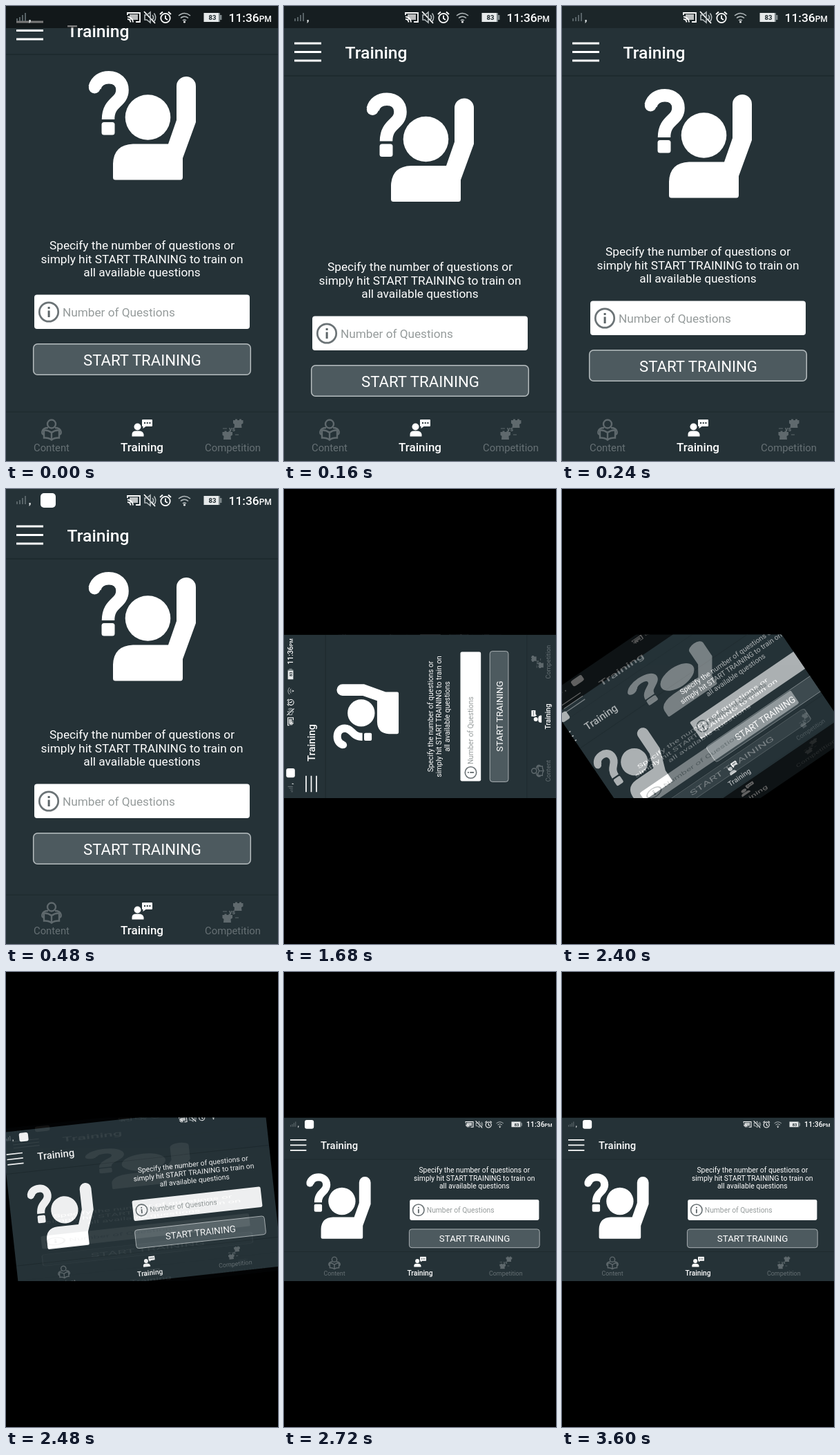
An HTML page for the animation above (3.68 s loop, 394 by 658 pixels).

```html
<!DOCTYPE html>
<html lang="en">
<head>
<meta charset="utf-8">
<title>Training screen</title>
<style>
  html, body { margin: 0; width: 100%; height: 100%; overflow: hidden; background: #000; }
  svg { display: block; width: 100vw; height: 100vh; }
  text { font-family: Roboto, "Noto Sans", sans-serif; fill: #fff; }
  .mid { text-anchor: middle; }
  .line { fill: none; stroke: #fff; }
  .dim text { fill: #667074; }
  .dim .line { stroke: #5f696d; }
  .dim .solid { fill: #5f696d; }
</style>
</head>
<body>
<svg viewBox="0 0 394 658">
  <defs>
    <clipPath id="band"><rect y="210.5" width="394" height="236.5"/></clipPath>
    <clipPath id="frame"><rect id="frameBox" height="658"/></clipPath>

    <g id="signal">
      <path class="line" style="stroke:#5f6a6e" stroke-width="1.800" d="M16 22v-4M20 22v-6M24 22v-9M28 22v-12"/>
      <path fill="#dfe3e4" d="M33.500 20h2.200v2.400l-1.600 2h-.9l.7-2h-.4z"/>
      <rect id="badge" x="50" y="6" width="22" height="21" rx="5" fill="#fff"/>
    </g>

    <g id="status">
      <g class="line" stroke-width="1.800">
        <path d="M176 13v-3h18v13h-6M176 15.500a8 8 0 0 1 8 8M176 19a4.500 4.500 0 0 1 4.500 4.500"/>
        <path d="M200 8l16 17"/>
        <circle cx="231" cy="17.500" r="6.700"/>
        <path d="M231 13.500v4.500l3 2M223 12l4-3.500M239 12l-4-3.500"/>
      </g>
      <g class="line" stroke-width="1.600" style="stroke:#b4bbbd">
        <path d="M201 13h3l5-4v15l-5-4h-3zM212 13q3 3.500 0 7M214.500 10.500q4.500 6 0 12"/>
        <path d="M250 14q8.500-7 17 0M253 17.500q5.500-4.500 11 0M256 21q2.500-2 5 0"/>
      </g>
      <rect x="179" y="12" width="12" height="8" fill="#fff" opacity=".7"/>
      <circle cx="258.500" cy="23" r="1.500" fill="#fff"/>
      <path d="M286.500 10h21.500v13h-21.500z" fill="#e6e9ea"/>
      <path d="M308 10h2v3h2.500v7h-2.500v3h-2z" fill="#7b8588"/>
      <text class="mid" x="299" y="20" font-size="9.500" font-weight="700" style="fill:#1d282c">83</text>
      <text x="322.500" y="23" font-size="17.400" font-weight="500">11:36<tspan font-size="12">PM</tspan></text>
    </g>

    <g id="head">
      <path class="line" stroke-width="2.800" d="M15 54h39M15 66.500h39M15 79h39"/>
      <text x="88.500" y="75.500" font-size="24.700" font-weight="500">Training</text>
    </g>

    <g id="pupil" fill="#fff">
      <path class="line" stroke-width="18.500" d="M128.500 144C131 134 139 129.200 149 129.200C161 129.200 168.500 137 168.500 147.500C168.500 166 148 164 148 190"/>
      <circle cx="128.300" cy="144" r="8.500"/>
      <rect x="138.500" y="194" width="19" height="18.500" rx="3.500"/>
      <circle cx="205.500" cy="187" r="32.800"/>
      <path d="M155 274V254Q156 226.500 184 225.500H235L247 191V142A14 14 0 0 1 275 142V194L256 246V274Q256 277.500 252.500 277.500H158.500Q155 277.500 155 274Z"/>
    </g>

    <g id="form">
      <g class="mid" font-size="17.250">
        <text x="197" y="361">Specify the number of questions or</text>
        <text x="197" y="380.700">simply hit START TRAINING to train on</text>
        <text x="197" y="400.300">all available questions</text>
      </g>
      <rect x="41" y="426.500" width="312" height="49.500" rx="4" fill="#fff"/>
      <circle class="line" cx="62" cy="451.500" r="13.700" stroke-width="2.700" style="stroke:#6b7376"/>
      <path fill="#5c6568" d="M60.600 444h3v3h-3zM60.600 449.500h3v9.500h-3z"/>
      <text x="82" y="458" font-size="17.200" style="fill:#959b9b">Number of Questions</text>
      <rect x="39.700" y="497.700" width="314.600" height="44.600" rx="6" fill="#4d5a5f" stroke="#b6bdbf" stroke-width="1.500"/>
      <text class="mid" x="197.500" y="528.500" font-size="22.200">START TRAINING</text>
    </g>

    <g id="tabA" class="dim">
      <g class="line" stroke-width="2.400">
        <circle cx="66" cy="604.500" r="6"/>
        <path d="M66 617q-5-4-11-3.500v11q7-.500 11 3q4-3.500 11-3v-11q-6-.500-11 3.500zM66 617v10"/>
        <path d="M61 610q-7 0-8.500 5q-1 4 2.500 5M71 610q7 0 8.500 5q1 4-2.500 5"/>
      </g>
      <text class="mid" x="66" y="644" font-size="14.800">Content</text>
    </g>

    <g id="tabB">
      <g fill="#fff">
        <circle cx="190.500" cy="608.500" r="5"/>
        <path d="M182.500 622.500v-3q0-5 6-5h4q6 0 7 5v3z"/>
        <path d="M198 598h13q1 0 1 1v8q0 1-1 1h-8.500l-4 3v-3h-.500q-1 0-1-1v-8q0-1 1-1z"/>
      </g>
      <path fill="#253237" d="M200 602h2v2h-2zM203.700 602h2v2h-2zM207.400 602h2v2h-2z"/>
      <text class="mid" x="197" y="643.500" font-size="17" font-weight="500">Training</text>
    </g>

    <g id="tabC" class="dim">
      <path id="tower" class="solid" d="M329 599h3v-1.500h3v1.500h3v-1.500h3v1.500h2.500v4.500l-2.500 1.500l.500 5h-11l.500-5l-2-1.500z"/>
      <use href="#tower" x="-15.500" y="17"/>
      <text class="mid" x="327.500" y="615" font-size="9" font-weight="700">vs</text>
      <path class="line" stroke-width="1.200" d="M314 611h6M337 620h-5"/>
      <text class="mid" x="328.500" y="644" font-size="14.850">Competition</text>
    </g>
  </defs>

  <rect width="394" height="658" fill="#000"/>
  <g id="stage">
    <g id="spin">
      <g id="wide" clip-path="url(#frame)">
        <rect y="210.500" width="394" height="236.500" fill="#253237"/>
        <path d="M0 271h394M0 404.500h394" stroke="#1e2a2e"/>
        <g id="wideParts"></g>
      </g>
      <g id="tall">
        <rect width="394" height="658" fill="#253237"/>
        <path d="M0 587h394" stroke="#1f2b2f" stroke-width="1.500"/>
        <g id="tallHead">
          <path d="M0 101h394" stroke="#1d282c" stroke-width="1.500"/>
          <use href="#head"/>
        </g>
        <use id="tallPupil" href="#pupil"/>
        <use id="tallForm" href="#form"/>
        <use href="#tabA"/><use href="#tabB"/><use href="#tabC"/>
        <rect id="shade" width="394" height="32" fill="#000"/>
        <use href="#signal"/><use href="#status"/>
      </g>
    </g>
  </g>
</svg>
<script>
const LOOP = 3680, SCALE = 0.6, CX = 197, CY = 329;
const el = id => document.getElementById(id);
const set = (id, name, value) => el(id).setAttribute(name, value);

// Landscape layout: part, x offset, y offset
const wideLayout = [
  ["signal", 0, 210.5], ["status", 157.6, 210.5], ["head", 0, 210.5],
  ["pupil", -39.4, 219.3], ["form", 157.6, 73.3],
  ["tabA", 33.4, 53], ["tabB", 78.8, 53], ["tabC", 124.2, 53]
];
el("wideParts").innerHTML = wideLayout.map(([id, x, y]) =>
  `<use href="#${id}" transform="translate(${x} ${y}) scale(${SCALE})"/>`).join("");

// Portrait steps: time, header y, figure y, form y, status shade, badge opacity
const settle = [
  [0, -31, -26, -9, 0.52, 0],
  [160, 0, 5.5, 22, 0.4, 0],
  [240, 0, 0, 0, 0.25, 0],
  [320, 0, 0, 0, 0.1, 0.3],
  [400, 0, 0, 0, 0, 0.7],
  [480, 0, 0, 0, 0, 1]
];
// Rotation steps: time, progress
const turn = [[1680, 0], [2400, 0.62], [2480, 0.93], [2560, 1]];

const stepAt = (steps, time) => steps.findLast(step => step[0] <= time);
const moveY = (id, y) => set(id, "transform", `translate(0 ${y})`);

function drawPortrait(time) {
  const [, head, pupil, form, shade, badge] = stepAt(settle, time);
  moveY("tallHead", head);
  moveY("tallPupil", pupil);
  moveY("tallForm", form);
  set("shade", "opacity", shade);
  set("badge", "opacity", badge);
}

function drawTurn(time) {
  const step = stepAt(turn, time);
  set("wide", "visibility", step ? "visible" : "hidden");
  if (!step) {
    el("stage").removeAttribute("clip-path");
    el("spin").removeAttribute("transform");
    el("tall").removeAttribute("transform");
    set("tall", "opacity", 1);
    return;
  }
  const p = step[1];
  const sx = SCALE + (1 - SCALE) * p;
  const sy = SCALE + (SCALE * SCALE - SCALE) * p;
  set("stage", "clip-path", "url(#band)");
  set("spin", "transform", `rotate(${-90 * (1 - p)} ${CX} ${CY})`);
  set("tall", "transform", `translate(${CX} ${CY}) scale(${sx} ${sy}) translate(${-CX} ${-CY})`);
  set("tall", "opacity", 1 - p);
  set("frameBox", "x", CX - CX * sx);
  set("frameBox", "width", 2 * CX * sx);
}

function paint() {
  const time = performance.now() % LOOP;
  drawPortrait(time);
  drawTurn(time);
  requestAnimationFrame(paint);
}
paint();
</script>
</body>
</html>
```
